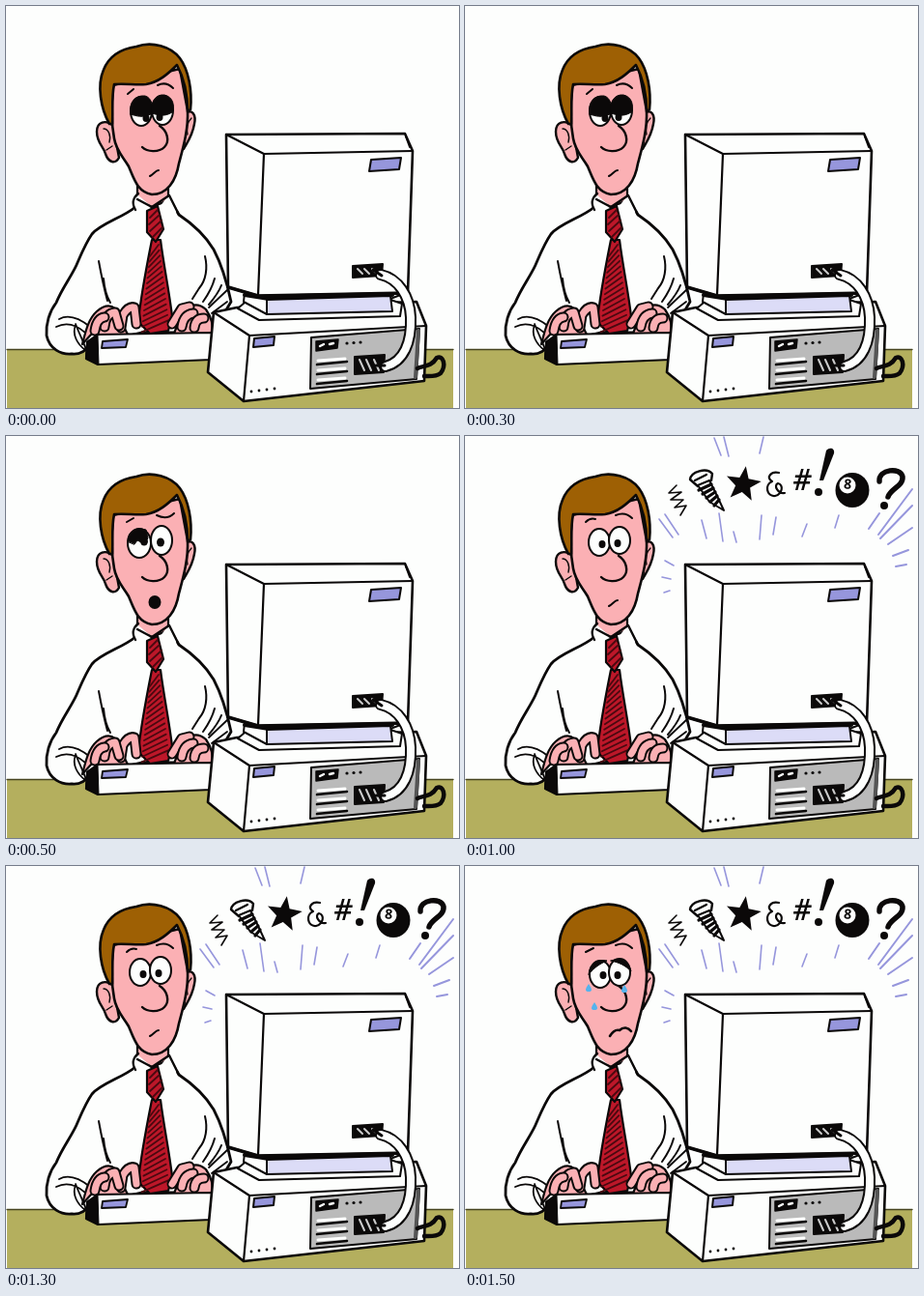
An HTML page with a canvas that plays this animation: 469x416 px, repeating every 2 s.

```html
<!DOCTYPE html>
<html lang="en">
<head>
<meta charset="utf-8">
<title>Trouble at the desk</title>
<style>
html, body { margin: 0; width: 100%; height: 100%; overflow: hidden; background: #fdfefd; }
canvas { display: block; }
</style>
</head>
<body>
<canvas id="stage" width="469" height="416"></canvas>
<script>
const ctx = document.getElementById('stage').getContext('2d');
const INK = '#0b0909', WHITE = '#fdfefd', LILAC = '#9696dc', SKIN = '#fbb0b4';
const HAIR = '#9e6004', DESK = '#b4af5e', PANEL = '#bababa', RED = '#bd1729';
const STEP = 500;

function shape(d, fill, width = 2, color = INK) {
  const path = new Path2D(d);
  if (fill) { ctx.fillStyle = fill; ctx.fill(path); }
  if (width) { ctx.lineWidth = width; ctx.strokeStyle = color; ctx.stroke(path); }
}

function line(d, width = 2, color = INK) { shape(d, null, width, color); }

// A thick outlined stroke, for fingers and cables.
function tube(d, width, fill) {
  line(d, width);
  line(d, width - 4, fill);
}

function oval(x, y, rx, ry, fill, width = 0) {
  ctx.beginPath();
  ctx.ellipse(x, y, rx, ry, 0, 0, Math.PI * 2);
  ctx.fillStyle = fill;
  ctx.fill();
  if (width) { ctx.lineWidth = width; ctx.strokeStyle = INK; ctx.stroke(); }
}

function label(text, x, y, font, angle = 0) {
  ctx.save();
  ctx.translate(x, y);
  ctx.rotate(angle);
  ctx.font = `${font} "Open Sans", sans-serif`;
  ctx.textAlign = 'center';
  ctx.textBaseline = 'middle';
  ctx.fillStyle = INK;
  ctx.fillText(text, 0, 0);
  ctx.restore();
}

function drawDesk() {
  ctx.fillStyle = DESK;
  ctx.fillRect(1, 355, 462, 61);
  line('M1 355.5H463', 1.4, '#45431f');
}

function drawBody() {
  // shirt
  shape('M134 208C121 219 98 225 89 236C82 246 77 259 73 268C67 281 58 292 52 307C45 316 41 329 42 341C45 355 57 361 68 360C76 361 82 358 88 350L140 338L214 338L233 306C229 287 224 269 215 252C206 237 194 226 179 216L171 202Z', WHITE, 2.8);
  line('M96 264C98 275 101 290 105 305M101 282C102 294 104 300 108 307', 2);
  line('M206 259C209 271 207 284 200 292L193 303M216 282C213 293 209 299 204 306M223 289C220 297 215 303 210 309', 2);
  line('M55 324C66 318 77 324 87 332M52 332C64 326 74 331 82 338M72 329C76 340 80 346 83 356M72 330C68 340 74 350 82 356', 1.8);
  line('M210 312L229 294M213 318L229 306', 1.8);

  // neck and collar
  shape('M136 184L136 201L151 208L168 201L168 184Z', SKIN, 2.2);
  shape('M136 195L131 204L134 217L150 207Z', WHITE, 0);
  shape('M169 195L178 211L173 218L159 208Z', WHITE, 0);
  line('M137 194C131 199 130 204 134 211M136 200L151 208L169 196L179 216', 2.4);

  // tie
  shape('M151 242L160 242C163 267 169 295 172 321L168 336L149 339L137 327C139 304 144 277 151 242Z', RED, 2.2);
  shape('M146 212L157 207L163 231L155 244L146 234Z', RED, 2.2);
  for (let i = 0; i < 15; i++) {
    const y = 252 + i * 5.6;
    line(`M${149 - i * .6} ${y + 7}L${158 + i * .7} ${y - 5}`, 1.8, '#4a0910');
  }
  line('M149 219L157 211M148 226L159 216M149 233L161 222M152 239L162 229', 1.8, '#4a0910');
}

function drawHands() {
  shape('M79 350C83 334 86 323 94 316C101 310 108 309 113 313L126 340H88Z', SKIN, 2.2);
  for (const d of ['M119 333L121 320Q127 310 133 312L135 329', 'M102 332Q103 318 113 317L117 331', 'M92 336Q94 323 102 322'])
    tube(d, 11, SKIN);
  shape('M174 339L181 320C187 309 198 306 207 314C212 321 215 329 213 339Z', SKIN, 2.2);
  for (const d of ['M172 329L182 313L190 311', 'M182 332Q184 319 194 318', 'M195 333Q196 323 205 323'])
    tube(d, 11, SKIN);
}

function drawKeyboard() {
  shape('M84 348L95 340L213 338L215 344L212 366L95 371L83 365Z', WHITE, 2.2);
  shape('M84 347L95 341L96 371L83 365Z', INK, 1);
  shape('M100 347L126 345L124 353L99 354Z', LILAC, 1.8);
}

function drawHead() {
  // ears
  shape('M111 124C103 117 94 120 94 130C94 142 101 145 103 153C106 162 113 164 117 157Z', SKIN, 2.4);
  line('M101 127C106 127 109 134 107 141M104 149L110 145', 1.4);
  shape('M186 111C193 106 197 113 195 122C193 134 189 139 184 148Z', SKIN, 2.4);
  line('M192 116C187 121 187 128 188 133', 1.3);

  // jaw
  shape('M111 82C109 101 109 121 112 137C114 150 122 157 127 166C133 180 136 192 151 195C167 195 176 181 179 163C183 148 189 128 188 108L180 65L137 75Z', SKIN, 2.6);
  // hair
  shape('M107 122C98 106 94 82 101 66C107 51 121 44 135 42C151 36 171 42 180 54C189 66 193 88 191 107L188 109C188 91 184 74 177 61C168 70 158 79 145 81C134 82 124 80 112 81C109 95 111 109 110 122Z', HAIR, 2.6);
  // nose
  line('M159 124C167 129 170 140 164 146C158 152 146 151 141 146', 2.4);
}

function drawEye(x, y, rx, ry, px, py, size = 3.5) {
  oval(x, y, rx, ry, WHITE, 2);
  oval(px, py, size, size + .5, INK);
}

const faces = [
  function sleepy() {
    drawEye(140, 109, 11, 15, 145, 116);
    drawEye(162, 108, 11, 15, 159, 115);
    shape('M129 112C127 99 134 92 144 93C151 95 153 104 150 112C142 116 135 114 129 112Z', INK, 1);
    shape('M151 111C149 99 155 91 164 92C173 94 175 103 172 110C164 115 158 113 151 111Z', INK, 1);
    line('M126 91L132 86M157 82C163 79 169 81 173 85', 2);
    line('M149 176C153 174 155 170 158 170', 2);
  },
  function startled() {
    drawEye(138, 111, 12, 15, 143, 109, 4);
    drawEye(161, 108, 11, 15, 160, 110, 4);
    shape('M126 109C126 98 134 94 145 97L147 106L142 111L136 108L133 112Z', INK, 1);
    line('M125 89L132 85M156 82C162 85 169 85 174 80', 2);
    oval(154, 172, 6.5, 7, INK);
  },
  function surprised() {
    drawEye(139, 110, 11, 14, 142, 112);
    drawEye(160, 108, 11, 14, 158, 111);
    line('M125 89C129 85 132 85 135 86M156 82C163 79 169 81 173 85', 2);
    line('M149 176C153 174 155 170 158 170', 2);
  },
  function tearful() {
    drawEye(140, 112, 11, 14, 143, 113);
    drawEye(160, 110, 11, 14, 158, 113);
    shape('M128 112C129 101 136 96 147 98C140 101 134 105 128 112Z', INK, 1);
    shape('M151 98C162 94 170 99 172 109C166 103 160 100 151 98Z', INK, 1);
    line('M125 89L133 85M156 82C163 79 169 81 173 85', 2);
    line('M150 176C153 171 156 169 160 170C164 166 169 167 172 171', 2.6);
    for (const [x, y] of [[128, 126], [134, 145], [165, 127]])
      shape(`M${x} ${y - 4}q-6 8 0 8q6 0 0-8Z`, '#56b3ed', 0);
  }
];

function drawMonitor() {
  shape('M228 133L413 132L421 150L416 297L261 300L230 291Z', WHITE, 2.6);
  line('M228 133L267 153L421 150M267 153L261 299', 2.2);
  line('M414 135L418 146', 2);
  line('M230 291L261 300L416 297', 3.5);
  shape('M378 159L409 157L407 169L376 171Z', LILAC, 2);
}

function drawTower() {
  shape('M215 317L239 312L425 306L435 331L433 388L246 409L209 379Z', WHITE, 2.6);
  line('M215 317L252 341L435 331M252 341L246 409', 2.2);

  // swivel stand
  shape('M240 313L262 325L408 321L410 308L398 304L247 307Z', WHITE, 2);
  shape('M247 297L261 300L416 296L398 303L272 305L270 319L246 306Z', WHITE, 2);
  line('M247 299L272 303L400 299', 4);
  shape('M270 304L398 300L400 316L270 319Z', '#dcdcf7', 2);

  shape('M257 344L278 342L277 351L256 353Z', LILAC, 2);
  for (let i = 0; i < 4; i++) oval(254 + i * 8, 399 - i, 1.4, 1.4, INK);

  // rear panel
  shape('M316 343L428 334L425 386L315 396Z', PANEL, 2);
  line('M427 336L424 384', 4, '#555');
  shape('M321 347L344 345L343 354L321 357Z', INK, 1.5);
  line('M325 352L329 350M335 350L339 349', 2.4, WHITE);
  for (let i = 0; i < 3; i++) {
    oval(353 + i * 7, 349 - i * .5, 1.6, 1.6, INK);
    line(`M322 ${371 + i * 10}l31-3`, 2.6);
    line(`M323 ${367 + i * 10}l28-2`, 3, WHITE);
  }
}

function drawPlug(x, y, height) {
  shape(`M${x} ${y + 2}l31-2l-1 ${height}l-30 2Z`, INK, 2);
  for (const dx of [5, 12, 20])
    line(`M${x + dx} ${y + 5}l5 ${height - 7}`, 2, '#ccc');
}

function drawCables() {
  line('M426 375C432 372 440 374 446 364C453 361 456 372 450 380C445 384 438 383 433 383', 4.5);
  drawPlug(359, 267, 12);
  drawPlug(361, 361, 18);
  tube('M388 278C406 282 418 300 419 322C420 348 412 368 393 373', 12, WHITE);
  line('M380 273L389 279M383 372L392 372', 3);
}

function drawRays() {
  line('M258 2L265 20M268 1L273 21M309 1L305 18M201 86L215 105M207 81L221 102M207 129L216 134M204 146L213 148M206 162L212 160', 1.6, LILAC);
  line('M245 87L250 106M263 80L267 109M278 99L281 110M307 82L305 107M322 84L319 102M354 91L349 104M387 82L383 95', 1.6, LILAC);
  line('M418 96L429 80M428 102L463 55M430 106L463 72M438 112L463 95M443 124L459 118M446 135L457 133', 2, LILAC);
}

function drawStar(x, y, radius) {
  ctx.beginPath();
  for (let i = 0; i < 10; i++) {
    const a = i * Math.PI / 5 - Math.PI / 2 + .15, r = i % 2 ? radius * .42 : radius;
    ctx.lineTo(x + r * Math.cos(a), y + r * Math.sin(a));
  }
  ctx.closePath();
  ctx.fillStyle = INK;
  ctx.fill();
}

function drawCursing() {
  drawRays();
  line('M219 51L211 59L224 58L213 66L226 66L217 74L229 72L223 82', 1.6);
  // screw
  shape('M233 45C234 37 250 32 256 39L255 46L241 52Z', WHITE, 2.4);
  line('M238 46L250 40', 2.2);
  shape('M241 51L253 46L261 62L268 77L253 68Z', WHITE, 2);
  for (let i = 0; i < 5; i++) line(`M${242 + i * 4} ${56 + i * 4}l${13 - i * 2} -6`, 3.2);
  drawStar(288, 50, 19);
  line('M325 38C317 36 311 43 318 47C310 50 312 63 321 62C329 60 330 50 324 49C319 51 324 60 331 59', 2.2);
  label('#', 349, 48, 'italic 600 30px');
  shape('M374 15C378 11 383 13 382 18L371 46L367 46Z', INK, 0);
  oval(366, 58, 4, 4, INK);
  oval(401, 56, 17.5, 18, INK);
  oval(396, 51, 8.5, 8.5, WHITE);
  label('8', 396, 51, 'bold 14px', .1);
  line('M429 47C428 34 451 32 453 42C454 52 441 54 438 63', 5.5);
  oval(434, 72, 4, 4, INK);
}

function render(now) {
  const pose = Math.floor(now / STEP) % faces.length;
  ctx.fillStyle = WHITE;
  ctx.fillRect(0, 0, 469, 416);
  ctx.lineJoin = ctx.lineCap = 'round';
  drawDesk();
  if (pose > 1) drawCursing();
  drawBody();
  drawHands();
  drawKeyboard();
  drawHead();
  faces[pose]();
  drawTower();
  drawMonitor();
  drawCables();
}

const start = performance.now();
function tick() {
  render(performance.now() - start);
  requestAnimationFrame(tick);
}
tick();
</script>
</body>
</html>
```
